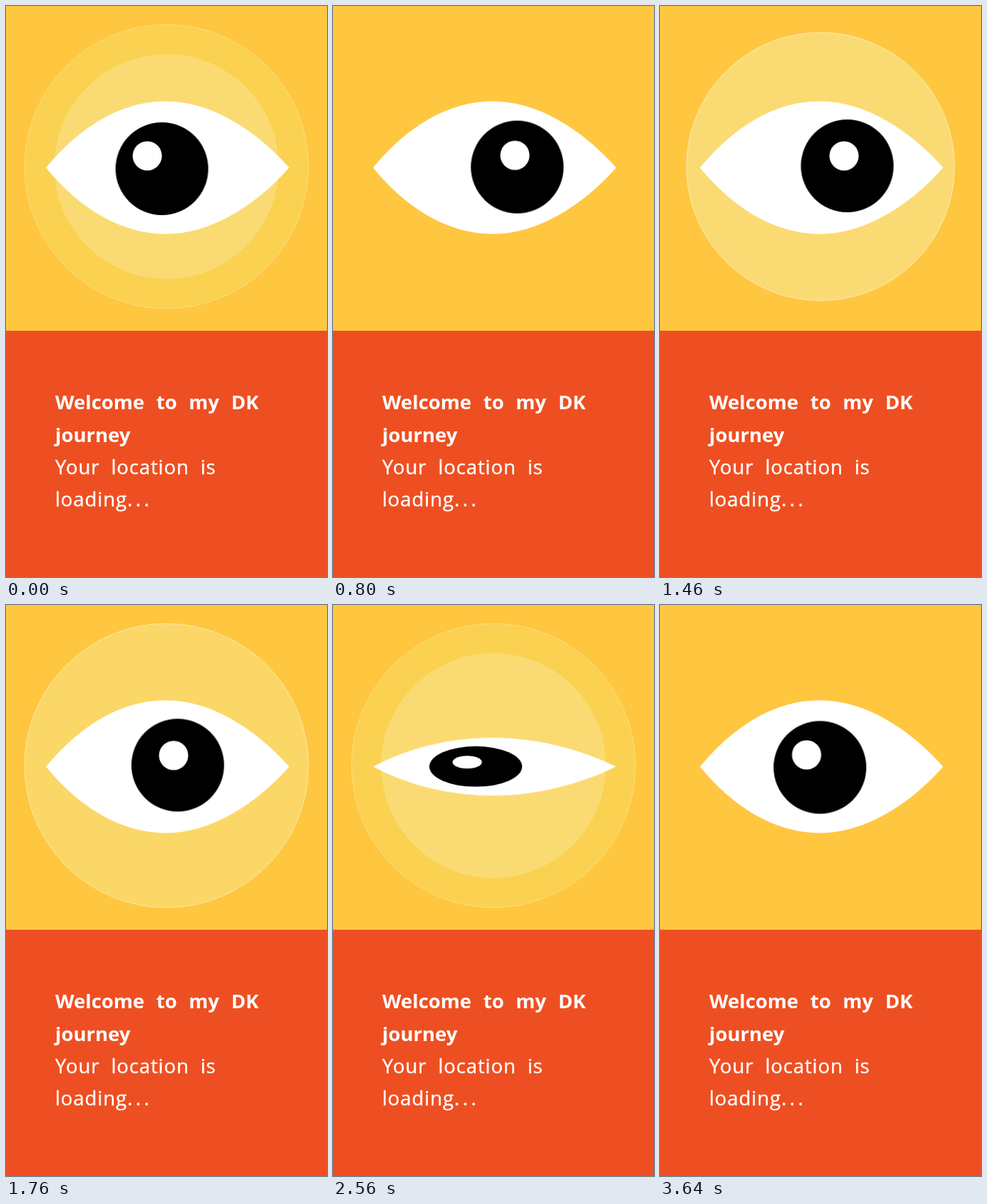
Recreate the animation shown at these times as an HTML page. Size 450x800 px, loop 3.66 s.

```html
<!DOCTYPE html>
<html lang="en">
<head>
<meta charset="utf-8">
<title>Loading</title>
<style>
  html, body { margin: 0; width: 100%; height: 100%; overflow: hidden; background: #ffc640; }
  svg { display: block; width: 450px; height: 800px; }
  text { font: 400 27.5px "Open Sans", sans-serif; fill: #fff; stroke: #fff; stroke-width: .4px; stroke-linejoin: round; letter-spacing: .9px; word-spacing: 8px; }
  .bold { font-weight: 700; stroke: none; letter-spacing: 0; word-spacing: 9.5px; }
  .dots { letter-spacing: 4.5px; }

  .halo, .core, .eye, .pupil, .glint { animation: 3660ms linear infinite; }
  .halo, .core { transform-origin: 225px 225px; }
  .halo { animation-name: halo; stroke: #fff; vector-effect: non-scaling-stroke; }
  .core { animation-name: core; fill: #fadb73; }
  .eye { animation-name: blink; transform-origin: 226px 226.5px; }
  .lids { fill: #fff; stroke: #fff; stroke-width: 1.5px; stroke-linejoin: round; }
  .pupil { animation-name: look; }
  .glint { animation-name: shine; fill: #fff; }

  /* Both rings vanish at once when the inner cycle restarts. */
  @keyframes halo {
    0%, 5.46% { transform: scale(1); fill: #fbd151; stroke-opacity: .3; }
    5.47% { transform: scale(0); fill: #fadb73; stroke-opacity: .55; animation-timing-function: cubic-bezier(.5, 0, .8, .75); }
    28.96% { transform: scale(.683); animation-timing-function: cubic-bezier(.35, .45, .7, .9); }
    44.26% { transform: scale(1); fill: #fadb73; stroke-opacity: .55; }
    55% { fill: #fbd151; stroke-opacity: .3; }
    95.62% { transform: scale(1); fill: #fbd151; stroke-opacity: .3; }
    95.63%, 100% { transform: scale(0); fill: #fadb73; stroke-opacity: 0; }
  }
  @keyframes core {
    0%, 5.46% { transform: scale(1); }
    5.47%, 41% { transform: scale(0); animation-timing-function: ease-in-out; }
    58.5%, 95.62% { transform: scale(1); }
    95.63%, 100% { transform: scale(0); }
  }
  @keyframes blink {
    0%, 25.8%, 39.3%, 60.4%, 73.6%, 100% { transform: scaleY(1); animation-timing-function: cubic-bezier(.33, 0, .67, 1); }
    32.8%, 67.2% { transform: scaleY(.06); animation-timing-function: cubic-bezier(.33, 0, .67, 1); }
  }
  @keyframes look {
    0% { transform: translate(218.5px, 228px); animation-timing-function: ease-out; }
    5.46% { transform: translate(222px, 228px); animation-timing-function: ease-in; }
    11.48% { transform: translate(225.5px, 227.5px); animation-timing-function: cubic-bezier(.35, .1, .5, 1); }
    28.96% { transform: translate(268.5px, 225px); animation-timing-function: ease-in; }
    39.89% { transform: translate(262.5px, 224px); animation-timing-function: cubic-bezier(.4, .15, .6, .85); }
    59.56% { transform: translate(206px, 225px); animation-timing-function: ease-out; }
    71% { transform: translate(200px, 226px); animation-timing-function: cubic-bezier(.45, 0, .8, .7); }
    84.15% { transform: translate(209px, 227px); }
    90.16% { transform: translate(218.5px, 228px); animation-timing-function: ease-out; }
    95.63% { transform: translate(222px, 228px); animation-timing-function: ease-in; }
    99.45%, 100% { transform: translate(224.2px, 227.5px); }
  }
  @keyframes shine {
    0% { transform: translate(198px, 210px); }
    5.46% { transform: translate(202px, 210px); animation-timing-function: ease-in; }
    11.48% { transform: translate(207px, 210px); animation-timing-function: cubic-bezier(.35, .1, .5, 1); }
    28.96% { transform: translate(270px, 209px); animation-timing-function: ease-in; }
    39.89% { transform: translate(258px, 210px); animation-timing-function: cubic-bezier(.4, .15, .6, .85); }
    59.56% { transform: translate(198px, 212px); animation-timing-function: ease-out; }
    71% { transform: translate(188px, 212px); animation-timing-function: ease-in; }
    84.15% { transform: translate(193px, 211px); }
    90.16% { transform: translate(198px, 210px); }
    95.63% { transform: translate(202px, 210px); animation-timing-function: ease-in; }
    99.45%, 100% { transform: translate(205.5px, 210px); }
  }
</style>
</head>
<body>
<svg viewBox="0 0 450 800">
  <rect width="450" height="455" fill="#ffc640"/>
  <rect y="455" width="450" height="345" fill="#ee4f22"/>
  <circle class="halo" cx="225" cy="225" r="199"/>
  <circle class="core" cx="225" cy="225" r="157.5"/>
  <g class="eye">
    <path class="lids" d="M57 226.5C103 171 160 134.3 224 134.3S350 175 396 226.5C350 278 288 318.7 224 318.7S103 282 57 226.5Z"/>
    <circle class="pupil" r="65"/>
    <circle class="glint" r="20.5"/>
  </g>
  <text class="bold" x="69" y="565">Welcome to my DK</text>
  <text class="bold" x="69" y="611">journey</text>
  <text x="69" y="656">Your location is</text>
  <text x="69" y="701">loading<tspan class="dots">...</tspan></text>
</svg>
</body>
</html>
```
